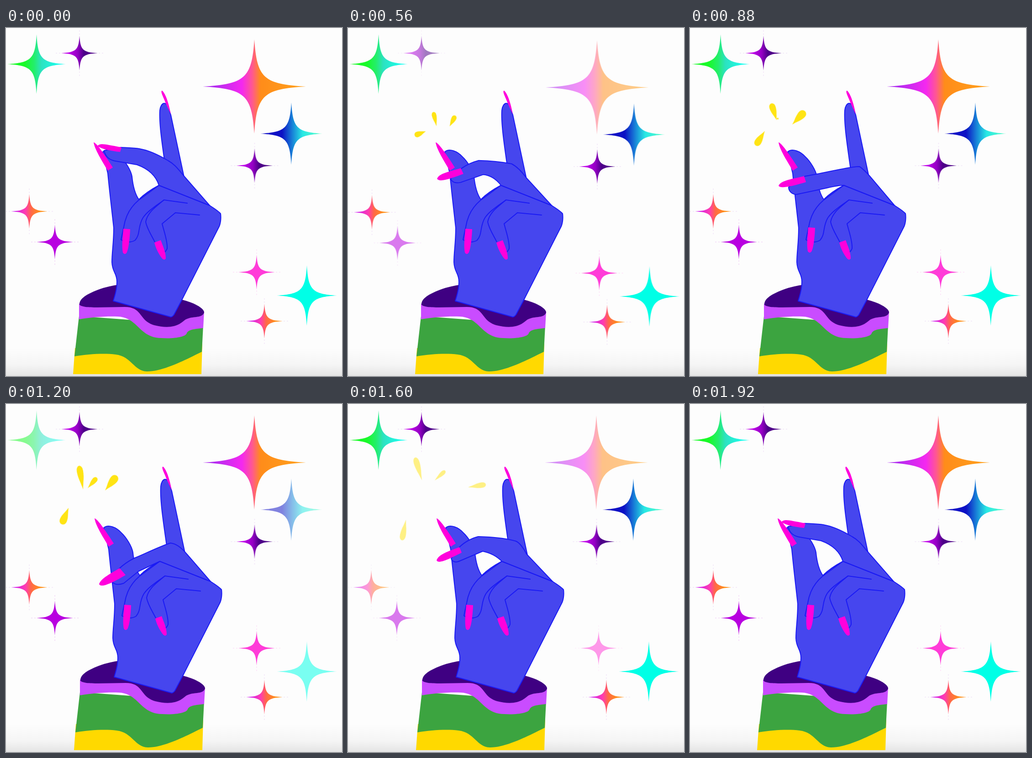
An HTML page that plays this animation: 736x761 px, repeating every 2000 ms.

```html
<!DOCTYPE html>
<html lang="en">
<head>
<meta charset="utf-8">
<title>Snapping fingers</title>
<style>
  html, body { margin: 0; width: 100%; height: 100%; overflow: hidden; background: #fdfdfd; }
  svg { display: block; width: 100vw; height: 100vh; }
  .skin { fill: #4646ee; stroke: #1a1af4; stroke-width: 2; stroke-linejoin: round; }
  .line { fill: none; stroke: #1a1af4; stroke-width: 2; stroke-linecap: round; stroke-linejoin: round; }
  .nail { fill: #ff00dc; }
  #sparks { fill: #ffe414; }
</style>
</head>
<body>
<svg viewBox="0 0 736 761">
  <defs>
    <linearGradient id="floor" x2="0" y2="1">
      <stop stop-color="#fdfdfd"/><stop offset=".6" stop-color="#f5f5f5"/><stop offset="1" stop-color="#e4e4e4"/>
    </linearGradient>
  </defs>
  <rect width="736" height="761" fill="#fdfdfd"/>
  <rect y="700" width="736" height="61" fill="url(#floor)"/>

  <g id="stars"></g>

  <g id="figure">
    <g id="sleeve">
      <path fill="#ffd900" d="M151 700L147 757H428L430 690Z"/>
      <path fill="#3ca440" d="M160 630L150 718C180 713 215 711 240 714C275 718 280 750 308 751C345 752 400 722 429 708L432 650Z"/>
      <path fill="#c94cff" d="M160 603L160 637C190 632 220 630 245 631C290 633 290 677 340 678C370 680 395 675 396 667C400 658 420 658 432 656L434 620Z"/>
      <path fill="#3f0082" d="M161 605C160 592 178 582 195 575C212 568 228 564 243 562L385 594C410 600 434 612 434 622C430 637 403 628 390 640C372 656 350 656 325 650C290 640 300 610 260 610L200 611C180 611 165 610 161 605Z"/>
    </g>

    <path class="skin" d="M350 310C343 260 335 210 337 180C339 162 352 158 357 178L361 190L392 335Z"/>
    <path class="nail" d="M342 137C350 143 358 170 361 189L350 165C345 151 337 138 342 137Z"/>

    <path class="skin" d="M235 597L361 632Q364 632 368 627L385 595L467 434C471 425 471 412 470 406C465 400 455 394 446 388L335 344C320 352 302 364 291 375C282 362 278 345 276 325C274 312 262 292 250 281C240 270 222 262 212 271L223 318C227 360 232 400 236 437C236 470 232 490 232 512C233 535 243 535 243 555C243 575 238 585 235 597Z"/>
    <path class="line" d="M335 344L290 377C272 392 262 410 258 435L252 463C262 470 275 469 283 464C295 450 288 435 300 415C310 400 330 388 346 376L397 383"/>
    <path class="line" d="M346 376C330 390 310 402 306 424C309 440 320 455 328 472M424 409L371 404L342 428C346 445 354 465 353 482Q351 488 347 490"/>
    <path class="nail" id="ringNail" d="M257 439L272 440C271 460 269 483 264 492Q259 497 256 491C253 475 256 455 257 439Z"/>
    <path class="nail" d="M325 469L339 464C344 478 350 490 350 504Q347 509 342 504C335 495 328 482 325 469Z"/>
    <path class="nail" d="M192 250C198 251 215 275 234 305L223 312C210 290 194 265 192 250Z"/>

    <path class="skin" id="finger"/>
    <path class="nail" id="fingerNail"/>
  </g>

  <g id="sparks"></g>
</svg>

<script>
const LOOP = 2000, STEP = 80;
const $ = id => document.getElementById(id);

function add(parent, tag, attrs) {
  const el = document.createElementNS('http://www.w3.org/2000/svg', tag);
  for (const k in attrs) el.setAttribute(k, attrs[k]);
  return parent.appendChild(el);
}

const run = (el, frames) => el.animate(frames, { duration: LOOP, iterations: Infinity });

// Moves through key poses, redrawn once per step.
const poseTimes = [0, 320, 720, 880, 1200, 1600, 1920, 2000];
function morph(el, poses) {
  run(el, poseTimes.map((t, i) => ({
    ...poses[i],
    offset: t / LOOP,
    easing: `steps(${Math.max(1, ((poseTimes[i + 1] || LOOP) - t) / STEP)}, end)`
  })));
}

// Keeps each value until the next cut.
const cuts = [0, 160, 560, 800, 1040, 1440, 1760];
function hold(el, prop, values) {
  const frames = values.map((v, i) => ({ [prop]: v, offset: cuts[i] / LOOP, easing: 'steps(1, end)' }));
  run(el, [...frames, { [prop]: values[0], offset: 1 }]);
}
const shift = (x, y) => `translate(${x}px, ${y}px)`;

// Stars
const fills = {
  green: ['#19fa28 .3', '#24ee6c .46', '#2ce2c0 .58', '#1cfff0 .9'],
  purple: ['#c000ea .2', '#9400c4 .45', '#4c0088 .62', '#5a1090 1'],
  sunset: ['#b02cf0 .1', '#f428f0 .38', '#ff5890 .48', '#ff8c1a .56', '#ffa21c 1'],
  blue: ['#1414c8 .1', '#0c10c4 .35', '#1884d8 .52', '#28e8e4 .68', '#60ffc8 1'],
  coral: ['#d020f0 .1', '#ff3cb0 .4', '#ff6848 .55', '#ff901a .8']
};
for (const id in fills) {
  const g = add(document.querySelector('defs'), 'linearGradient', { id });
  for (const s of fills[id]) {
    const [color, offset] = s.split(' ');
    add(g, 'stop', { offset, 'stop-color': color });
  }
}

// x, y, half width, half height, fill, dimmed poses
const stars = [
  [67, 79, 64, 65, 'green', '0000100'],
  [161, 55, 40, 38, 'purple', '0010000'],
  [544, 128, 113, 103, 'sunset', '0110010'],
  [625, 231, 68, 68, 'blue', '0000100'],
  [544.5, 301, 40, 38, 'purple', '0000000'],
  [51, 401, 40, 38, 'coral', '0000010'],
  [107, 468, 40, 38, '#b800e0', '0110010'],
  [549, 534, 40, 38, '#ff3cd8', '0000010'],
  [659, 585, 66, 66, '#00ffe6', '0000100'],
  [566, 641, 40, 38, 'coral', '0000000']
];

function starPath(rx, ry) {
  const p = (x, y) => `${x * rx} ${y * ry} `;
  const a = .05, b = .18;
  return 'M' + p(0, -1) +
    'C' + p(a, -b) + p(b, -a) + p(1, 0) +
    'C' + p(b, a) + p(a, b) + p(0, 1) +
    'C' + p(-a, b) + p(-b, a) + p(-1, 0) +
    'C' + p(-b, -a) + p(-a, -b) + p(0, -1) + 'Z';
}

const still = add($('stars'), 'g', {}), drift = add($('stars'), 'g', {});
stars.forEach(([x, y, rx, ry, fill, dim], i) => {
  const g = add(i < 2 ? still : drift, 'g', { transform: `translate(${x} ${y})` });
  const paint = fill[0] === '#' ? fill : `url(#${fill})`;
  add(g, 'path', { d: starPath(rx, ry), fill: paint });
  if (rx < 50) {
    add(g, 'path', {
      d: 'M42 0H56M-42 0H-56M0 40V52M0 -40V-52',
      stroke: fill[0] === '#' ? fill : '#b060e0',
      'stroke-dasharray': '3 4', opacity: .22
    });
  }
  hold(g, 'opacity', [...dim].map(d => d === '1' ? .52 : 1));
});
hold(drift, 'transform', [[0, 0], [0, 2], [1.5, 2], [0, 0], [0, 0], [0, 0], [0, 0]].map(p => shift(...p)));

// Hand
hold($('figure'), 'transform', [0, 0, 0, 2, 2, 2, 0].map(x => shift(x, 0)));
hold($('ringNail'), 'transform', [0, 0, 0, -3, 0, 0, 0].map(y => shift(0, y)));

const closed = {
  finger: 'L391 325C378 310 370 298 355 290C330 275 310 267 292 264C280 262 265 262 252 261L215 268C217 282 228 289 240 291L287 299C312 308 328 322',
  nail: 'M200 258C207 251 215 254 253 261L250 271C230 269 210 265 200 258Z'
};
const poses = [
  closed,
  {
    finger: 'L391 325C383 314 377 305 368 300C340 290 310 280 288 279C272 280 258 286 247 293L221 312C228 322 236 324 245 322L290 311C310 310 325 325',
    nail: 'M191 307C195 297 215 299 247 291L251 304C225 310 195 317 191 307Z'
  },
  {
    finger: 'L391 330C382 318 368 303 352 295C330 294 300 297 285 297C270 303 260 309 250 316L227 342C230 350 240 350 248 348L300 327C312 330 325 335',
    nail: 'M198 345C202 332 225 325 247 317L254 329C235 338 204 354 198 345Z'
  },
  {
    finger: 'L391 323C384 315 373 305 369 303C358 303 343 306 333 308C305 313 275 320 250 324L214 348C214 358 223 364 231 364L297 350C310 347 325 344',
    nail: 'M192 345C197 333 223 330 248 324L252 337C228 344 197 353 192 345Z'
  },
  {
    finger: 'L394 328C383 315 370 305 358 304C328 314 298 330 279 337C262 346 254 352 246 360L231 390C238 396 248 395 256 392L288 366C305 358 320 351',
    nail: 'M202 394C205 382 228 370 247 359L260 374C243 384 207 405 202 394Z'
  },
  {
    finger: 'L389 328C383 315 373 303 366 300C338 292 308 291 283 290C270 293 253 302 242 313L224 338C226 345 234 347 241 344L293 322C308 325 323 332',
    nail: 'M192 342C196 329 218 322 242 313L247 325C228 334 197 352 192 342Z'
  },
  closed, closed
];
morph($('finger'), poses.map(p => ({ d: `path("M446 388${p.finger} 335 344Z")` })));
morph($('fingerNail'), poses.map(p => ({ d: `path("${p.nail}")` })));

// Sparks: tip x, tip y, end x, end y, width for each open pose
const sparks = [
  [[176, 230, 154, 232, 11], [167, 223, 142, 238, 13], [164, 225, 144, 257, 15], [137, 227, 122, 263, 16], [127, 253, 118, 298, 13]],
  [[197, 225, 192, 204, 9], [192, 208, 184, 170, 11], [190, 202, 178, 165, 14], [169, 187, 160, 135, 14], [162, 167, 147, 117, 13]],
  [[222, 223, 231, 199, 9], [223, 210, 238, 187, 12], [224, 211, 252, 182, 17], [217, 189, 243, 157, 17], [263, 182, 302, 176, 12]],
  [[194, 200, 191, 197, 0], [194, 200, 191, 197, 0], [194, 200, 191, 197, 4], [179, 184, 199, 161, 11], [190, 167, 213, 146, 9]]
];

function sparkPose([x, y, ex, ey, w]) {
  const dx = ex - x, dy = ey - y;
  return { transform: `${shift(x, y)} rotate(${Math.atan2(dy, dx)}rad) scale(${Math.hypot(dx, dy) / 100}, ${w / 100})` };
}
for (const s of sparks) {
  const el = add($('sparks'), 'path', { d: 'M0 0C30 -18 50 -50 76 -50C108 -50 108 50 76 50C50 50 30 18 0 0Z' });
  const last = s[4];
  morph(el, [s[0], ...s, last, last].map(sparkPose));
}
hold($('sparks'), 'opacity', [0, 1, 1, 1, 1, .52, 0]);
</script>
</body>
</html>
```
